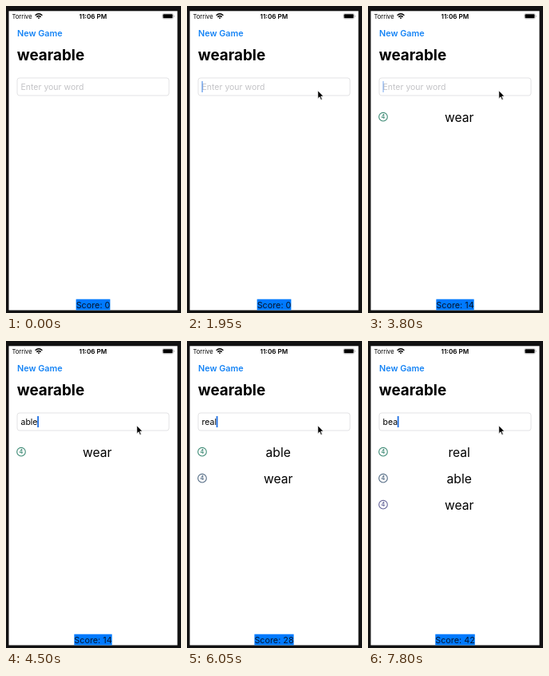
Animation, 219 px wide and 384 px high, one loop 8000 ms. Source, as an HTML page:

```html
<!DOCTYPE html>
<html lang="en">
<head>
<meta charset="utf-8">
<title>Word game</title>
<style>
  html, body { margin: 0; width: 100%; height: 100%; overflow: hidden; background: #121212; }
  svg { display: block; width: 100%; height: 100%; font-family: Inter, Roboto, sans-serif; }
  .middle { text-anchor: middle; }
  .body { font-size: 10.5px; }
  .bold { font-weight: 600; }
  .row text { font-size: 15.6px; }
  .row .count { font-size: 7.2px; font-weight: 600; fill: currentColor; }
  .row circle { fill: none; stroke: currentColor; stroke-width: 1.1; }
</style>
</head>
<body>
<svg viewBox="0 0 219 384">
  <rect width="219" height="384" fill="#121212"/>
  <rect x="3.5" y="6.3" width="211" height="374.2" fill="#fff"/>

  <text x="7.5" y="15.6" font-size="7.6">Torrive</text>
  <g fill="none" stroke="#000" stroke-width="1.5">
    <path d="M36.6 11.8Q41 7.8 45.4 11.8M38.3 13.7Q41 11.3 43.7 13.7"/>
    <path d="M41 16.3l-1.4-1.5q1.4-1 2.8 0z" fill="#000" stroke="none"/>
  </g>
  <text class="middle bold" x="108.8" y="15.5" font-size="8.1">11:06 PM</text>
  <rect x="195.6" y="9.5" width="13.8" height="6.6" rx="1.8" fill="none" stroke="#bbb" stroke-width=".6"/>
  <rect x="196.5" y="10.3" width="12" height="5" rx="1"/>
  <path d="M210 11.6q1.4 1.2 0 2.4z" fill="#888"/>

  <text class="bold" x="14" y="37.5" font-size="10.8" fill="#1684f5">New Game</text>
  <text x="13.7" y="68.3" font-size="18.8" font-weight="700">wearable</text>

  <rect x="14" y="90" width="190" height="22" rx="3" fill="#fff" stroke="#e3e3e5"/>
  <text id="hint" class="body" x="18.5" y="104.8" fill="#c3c3c6">Enter your word</text>
  <text id="entry" class="body" x="18.5" y="104.8"></text>
  <rect id="caret" y="94" width="1.8" height="14" fill="#1f70e4"/>

  <g id="rows"></g>

  <rect id="scoreBox" y="366.7" height="13.8" fill="#007aff"/>
  <text id="score" class="middle" x="109" y="377.7" font-size="10.8" fill="#06142c"></text>

  <g id="pointer">
    <circle id="ring" r="14.5" fill="none" stroke="#555" stroke-width="1"/>
    <path d="M0 0V10.2L2.3 8.1 3.8 11.7 5.6 11 4 7.4H7.2Z" stroke="#fff" stroke-width=".8"/>
  </g>
</svg>
<script>
  const LOOP = 8000;
  const $ = id => document.getElementById(id);
  const clamp = v => Math.min(1, Math.max(0, v));

  // Text in the field from each time onwards
  const typing = [
    [0, ''], [2000, 'w'], [2200, 'we'], [2350, 'wea'], [2500, 'wear'], [2700, 'erat'], [2850, ''],
    [4050, 'a'], [4200, 'ab'], [4400, 'abl'], [4500, 'able'], [4650, ''],
    [5250, 'r'], [5650, 're'], [5750, 'rea'], [6000, 'real'], [6400, ''],
    [7300, 'b'], [7650, 'be'], [7800, 'bea']
  ];
  const words = [[2850, 'wear'], [4650, 'able'], [6400, 'real']];
  const focused = [[1600, 2850], [3800, 4650], [5050, 6400], [7200, LOOP]];
  const clicks = [[700, 900], [3050, 3800], [7050, 7200]];
  const badgeColors = ['#3f8b76', '#536b84', '#66659a'];

  const spanAt = (spans, t) => spans.find(([from, to]) => t >= from && t < to);

  function caretOpacity(t, text) {
    const span = spanAt(focused, t);
    if (!span) return 0;
    if (text) return 1;
    const fadeIn = clamp((t - span[0] + 50) / 150);
    return t >= 1900 && t < 2000 ? 0.5 : fadeIn;
  }

  const rowMarkup = (word, i) => `
    <g class="row" transform="translate(0 ${139 + i * 33})">
      <g color="${badgeColors[i]}">
        <circle cx="19" cy="-.3" r="5.3"/>
        <text class="count middle" x="19" y="2.3">4</text>
      </g>
      <text class="middle" x="114.2" y="5.8">${word}</text>
    </g>`;

  let shownCount = -1;
  function showWords(list) {
    if (list.length === shownCount) return;
    shownCount = list.length;
    $('rows').innerHTML = list.map(rowMarkup).join('');
    $('score').textContent = `Score: ${shownCount * 14}`;
    const width = $('score').getComputedTextLength();
    $('scoreBox').setAttribute('x', 109 - width / 2);
    $('scoreBox').setAttribute('width', width);
  }

  function movePointer(t) {
    const p = clamp((t - 200) / 450);
    const eased = p * p * (3 - 2 * p);
    const x = 215.5 + (163.7 - 215.5) * eased;
    const y = 60 + (105.7 - 60) * eased;
    $('pointer').setAttribute('transform', `translate(${x} ${y})`);
    $('pointer').setAttribute('opacity', t < 50 ? 0 : 1);
    $('ring').setAttribute('opacity', spanAt(clicks, t) ? 1 : 0);
  }

  function draw(t) {
    const text = typing.filter(([from]) => from <= t).pop()[1];
    $('entry').textContent = text;
    $('hint').setAttribute('opacity', text ? 0 : 1);
    $('caret').setAttribute('x', 18.2 + (text ? $('entry').getComputedTextLength() : 0));
    $('caret').setAttribute('opacity', caretOpacity(t, text));
    showWords(words.filter(([from]) => from <= t).map(([, word]) => word).reverse());
    movePointer(t);
  }

  const start = performance.now();
  function tick() {
    draw((performance.now() - start) % LOOP);
    requestAnimationFrame(tick);
  }
  tick();
</script>
</body>
</html>
```
